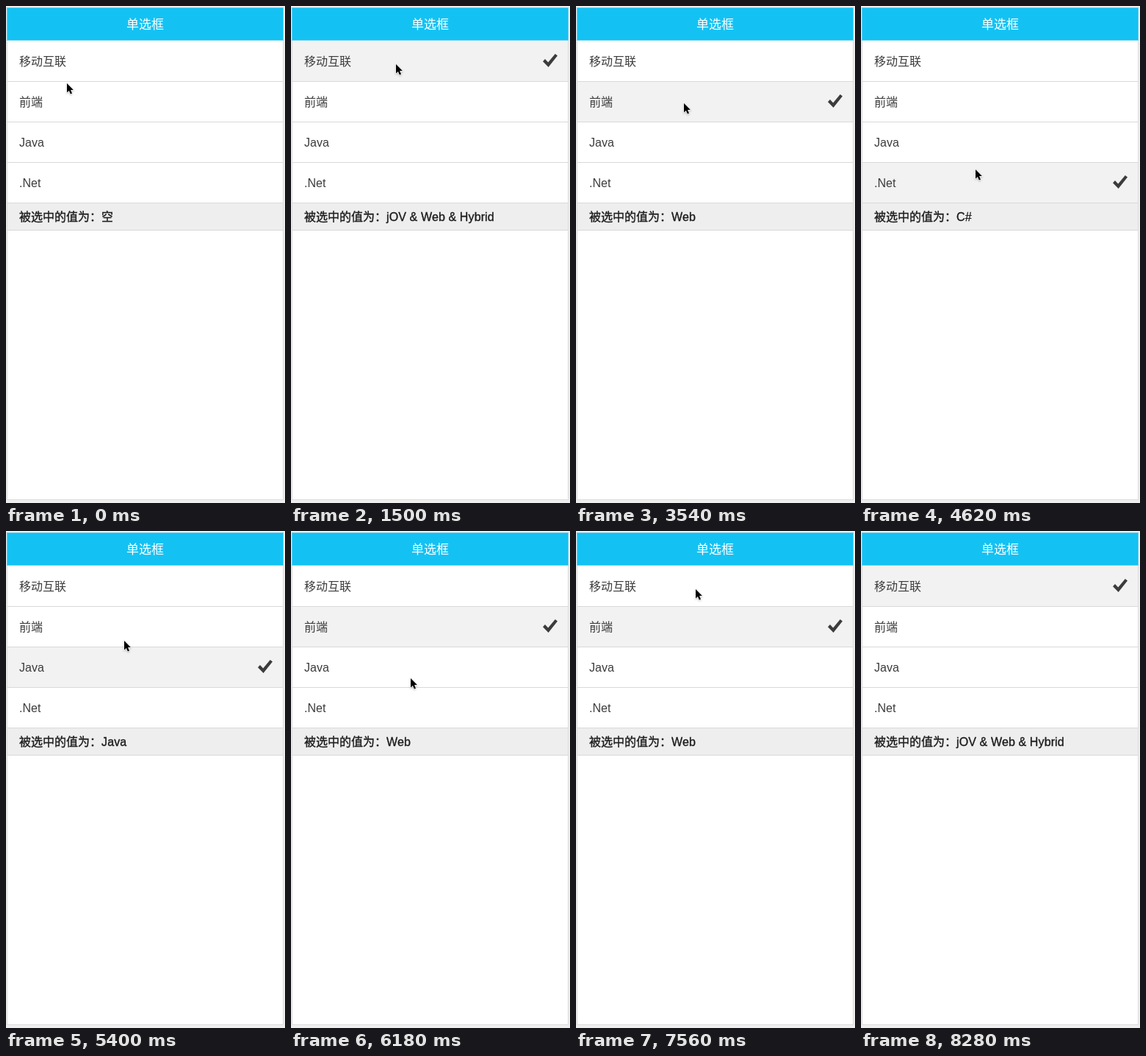
Animation, 380 px wide and 675 px high, one loop 8760 ms. Source, as an HTML page:

```html
<!DOCTYPE html>
<html lang="zh-CN">
<head>
<meta charset="utf-8">
<title>单选框</title>
<style>
  html, body { margin: 0; width: 100%; height: 100%; overflow: hidden; background: #efefef; }
  svg { display: block; }
  text { font: 16px "Liberation Sans", "Noto Sans CJK SC", "Noto Sans CJK", sans-serif; fill: #3c3c3c; }
  .title { font-size: 17px; font-weight: 500; fill: #fff; text-anchor: middle; }
  .result { font-weight: 500; fill: #1c1c1c; stroke: #1c1c1c; stroke-width: .35px; }
  #value { letter-spacing: .12px; }
  .line { fill: #d9d9d9; }
  #cursor { filter: drop-shadow(0 1px 1px rgba(0, 0, 0, .25)); }
</style>
</head>
<body>
<svg width="380" height="675" viewBox="0 0 380 675">
  <rect width="380" height="675" fill="#efefef"/>
  <rect x="1.5" y="2.5" width="376" height="668" fill="#fff" stroke="#dcdcdc"/>
  <rect x="1.5" y="2.5" width="376" height="44" fill="#13c2f3" stroke="#58cdf0"/>
  <text class="title" x="189.5" y="31">单选框</text>
  <g id="mark">
    <rect x="2" y="47" width="375" height="55" fill="#f2f2f2"/>
    <path d="M343 75.3 L346 72 L350.2 76.5 L359.8 65 L363 67.6 L350.6 83 Z" fill="#3c3c3c"/>
  </g>
  <rect x="2" y="268" width="375" height="36" fill="#eee"/>
  <g id="rows"></g>
  <rect class="line" x="2" y="304" width="375" height="1"/>
  <text class="result" x="18" y="292">被选中的值为：<tspan id="value"></tspan></text>
  <path id="cursor" d="M0 0 V12.6 L2.9 9.9 L4.8 14.6 L7 13.7 L5.1 9.1 H8.9 Z"
        fill="#000" stroke="#fff" stroke-width="1.2" paint-order="stroke"/>
</svg>
<script>
const LOOP = 8760, TICK = 60;
const FIRST_TAP = 1500, TAP_DELAY = 300;
const SWEEP_START = 4710, SWEEP = 930, SWEEP_END = SWEEP_START + 3 * SWEEP;
const options = [
  ['移动互联', 'jOV & Web & Hybrid'],
  ['前端', 'Web'],
  ['Java', 'Java'],
  ['.Net', 'C#']
];

const $ = id => document.getElementById(id);

$('rows').innerHTML = options.map(([label], i) => {
  const y = 47 + 55 * i;
  return `<text x="18" y="${y + 34}">${label}</text>
    <rect class="line" x="2" y="${y + 55}" width="375" height="1"/>`;
}).join('');

// Smooth 0 to 1 between two times
function ramp(t, start, end) {
  const p = Math.min(1, Math.max(0, (t - start) / (end - start)));
  return p * p * (3 - 2 * p);
}

// Row under the pointer: slow steps down the list, then quick sweeps up and down
function rowAt(t) {
  if (t < SWEEP_START) {
    return ramp(t, 2580, 2760) + ramp(t, 3600, 3960) + ramp(t, 4080, 4500);
  }
  const phase = (Math.min(t, SWEEP_END) - SWEEP_START) / SWEEP % 2;
  return 3 * (1 - (1 - Math.abs(1 - phase)) ** 2);
}

function pointerAt(t) {
  const row = rowAt(t);
  const enter = ramp(t, 600, 1140);
  const leave = ramp(t, 7560, 8280);
  return [
    83 + 60 * enter + 20 * ramp(t, 2580, 6000) + 230 * leave,
    105 - 33 * ramp(t, 0, 240) + 7 * enter + row * (55.6 - 2.65 * row) + 380 * leave
  ];
}

function draw(t) {
  const on = t >= FIRST_TAP;
  const picked = Math.round(rowAt(t - TAP_DELAY));
  $('mark').setAttribute('visibility', on ? 'visible' : 'hidden');
  $('mark').setAttribute('transform', `translate(0 ${55 * picked})`);
  $('value').textContent = on ? options[picked][1] : '空';
  $('cursor').setAttribute('transform', `translate(${pointerAt(t).map(Math.round).join(' ')})`);
}

const began = performance.now();
function loop() {
  const t = (performance.now() - began) % LOOP;
  draw(Math.floor(t / TICK) * TICK);
  requestAnimationFrame(loop);
}
loop();
</script>
</body>
</html>
```
